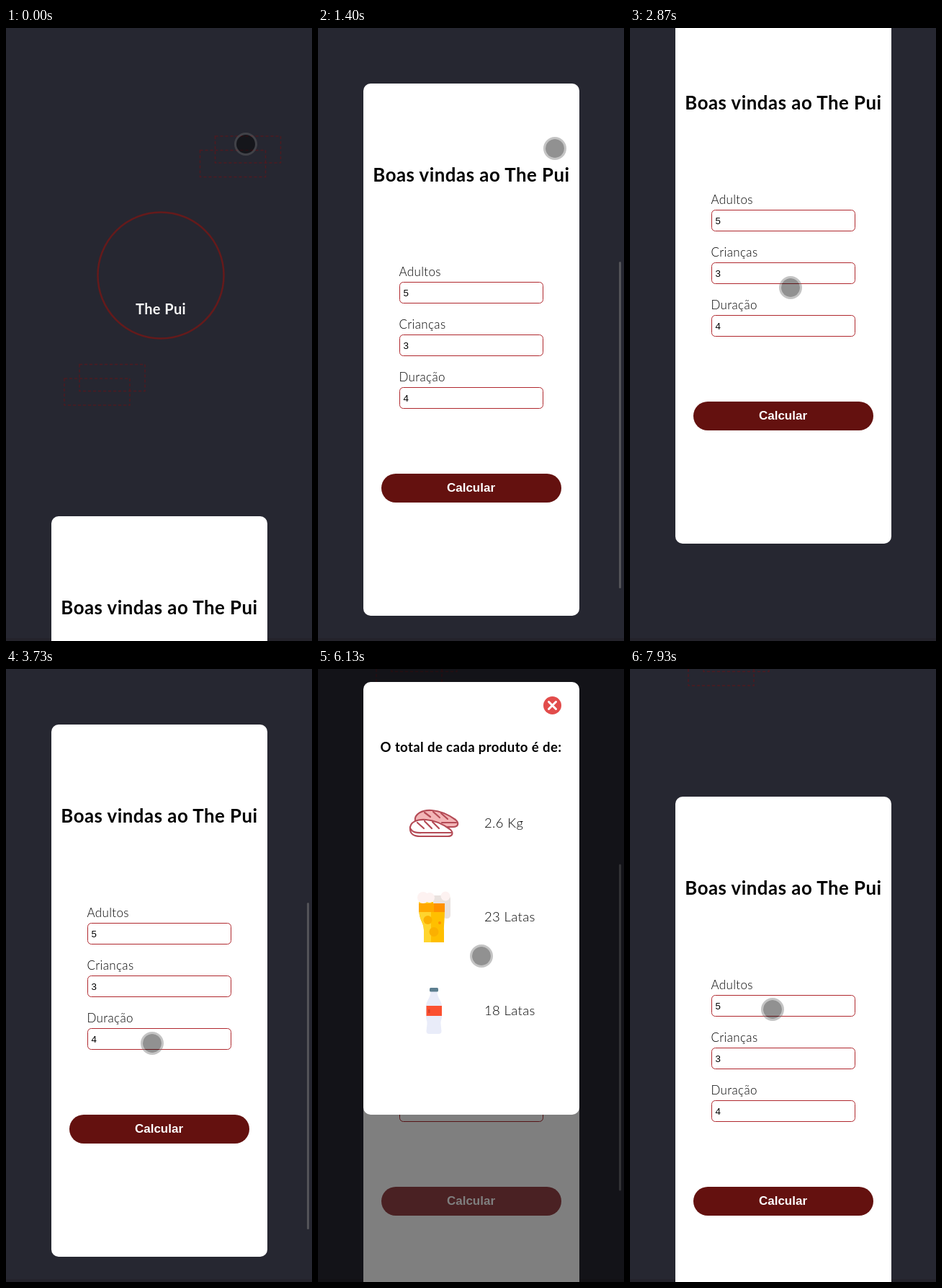
Write an HTML page that moves like this. It is 425 by 850 pixels and loops after 8 s.

```html
<!DOCTYPE html>
<html lang="pt">
<head>
<meta charset="utf-8">
<title>The Pui</title>
<style>
html, body { margin: 0; width: 100%; height: 100%; overflow: hidden; background: #262731; }
svg { display: block; width: 100%; height: 100%; }
text { font-family: Lato, sans-serif; letter-spacing: .02em; }
.mid { text-anchor: middle; }
.bold { font-weight: 700; }
.arial { font-family: "Liberation Sans", Arial, sans-serif; letter-spacing: 0; }
.light { font-weight: 300; font-size: 17px; }
.amount { font-size: 18.5px; }
.dash { fill: none; stroke: #4e1a20; stroke-width: 1.5; stroke-dasharray: 4 3; }
.field { fill: #fff; stroke: #b0282e; }
.meat { stroke: #b44b56; stroke-width: 2.2; stroke-linecap: round; stroke-linejoin: round; }
</style>
</head>
<body>
<svg viewBox="0 0 425 850">
  <defs>
    <g id="pair" class="dash">
      <rect x="21" width="91" height="37"/>
      <rect y="19.500" width="91" height="37"/>
    </g>
  </defs>
  <rect width="425" height="850" fill="#262731"/>
  <rect y="846" width="425" height="4" fill="#24232b"/>

  <g id="page">
    <use href="#pair" x="269.500" y="150"/>
    <use href="#pair" x="81" y="466.500"/>
    <circle cx="215" cy="343" r="87.500" fill="none" stroke="#651a1b" stroke-width="2.500"/>
    <text class="mid bold" x="215" y="397" font-size="20" fill="#f4f4f4">The Pui</text>

    <rect x="63" y="677" width="300" height="738" rx="10" fill="#fff"/>
    <text class="mid bold" x="213" y="813" font-size="25.800">Boas vindas ao The Pui</text>
    <g id="fields"></g>
    <rect id="button" x="88" y="1218" width="250" height="40" rx="20"/>
    <text class="mid bold arial" x="212.500" y="1243" font-size="17" fill="#fff">Calcular</text>
  </g>

  <g id="modal">
    <rect width="425" height="850" opacity=".5"/>
    <rect x="63" y="18" width="300" height="600" rx="10" fill="#fff"/>
    <circle cx="325.500" cy="50.500" r="12.500" fill="#e24c4b"/>
    <path d="M320.500 45.500l10 10m0-10l-10 10" stroke="#fff" stroke-width="3" stroke-linecap="round"/>
    <text class="mid bold" x="212.500" y="115" font-size="18.600">O total de cada produto é de:</text>

    <g class="meat">
      <path fill="#f3b5b7" d="M135 211C133 201 145 195 158 196C173 197 184 204 191 209C197 214 194 219 188 219H150Z"/>
      <path fill="none" d="M148 199l8 6m4-7l9 8m2-6l9 8M172 213h20"/>
      <path fill="#fff" d="M128 222C127 212 138 208 150 209C164 210 176 217 183 222C189 227 187 232 180 232H142C133 232 128 228 128 222Z"/>
      <path fill="none" d="M128 221C132 228 139 227 146 227H185M138 213l9 8m1-10l10 10m1-9l9 9"/>
    </g>

    <rect x="174" y="314" width="10" height="32" rx="4.500" fill="#e9e2df"/>
    <path id="glass" fill="#ffbf00" d="M140 323H176V330C176 350 175 350 175 362V379H147V362C147 350 140 350 140 330Z"/>
    <path fill="#ffd52e" d="M140 323H157V379H147V362C147 350 140 350 140 330Z"/>
    <path fill="#ffa800" d="M140 325h21v12h-21z"/>
    <path fill="#ff9100" d="M161 325h15v12h-15z"/>
    <g fill="#fbb000">
      <circle cx="152.500" cy="348" r="6"/><circle cx="161" cy="364.500" r="6.500"/>
      <circle cx="169" cy="352" r="2" fill="#ff9100"/>
    </g>
    <path fill="#e9e2df" d="M160 314h16v11h-16z"/>
    <g fill="#fdf2f1">
      <circle cx="146" cy="317" r="8"/><circle cx="155" cy="317" r="7"/><circle cx="177" cy="315" r="6.500"/>
    </g>

    <path fill="#e9ecf9" d="M156.500 447h9c0 9 6.500 13 6.500 21v14c0 4-2 6-1.500 10l1 10q0 4-4 4h-13q-4 0-4-4l1-10c.5-4-1.500-6-1.500-10v-14c0-8 6.500-12 6.500-21z"/>
    <rect x="155" y="442" width="12" height="5.500" rx="1.500" fill="#5d7f90"/>
    <path fill="#fb5030" d="M150.500 467h21.500v14h-21.500z"/>
    <path fill="#d8402a" d="M153 472h2.500v5h-2.500z"/>
    <g id="amounts"></g>
  </g>

  <rect id="thumb" x="418" width="3" height="453" rx="1.500" fill="#808080"/>
  <g id="cursor">
    <circle r="13" fill-opacity=".43"/>
    <circle r="14.500" fill="none" stroke="#6c6c6c" stroke-opacity=".4" stroke-width="3"/>
  </g>
</svg>
<script>
const LOOP = 8000, FPS = 15, OPEN = 4270, CLOSE = 7270;
const $ = id => document.getElementById(id);
const clamp = v => Math.min(1, Math.max(0, v));

// each move: start, duration, where it ends
const scrolls = [[530, 870, 600], [2070, 190, 700], [2930, 450, 600], [5130, 540, 500]];
const moves = [[70, 330, 329, 167], [1450, 950, 223, 360], [3400, 600, 188, 637],
  [OPEN, 400, 266, 407], [4670, 1000, 190, 414], [5870, 260, 227, 398],
  [6130, 540, 332, 57], [6730, 70, 332, 54], [CLOSE, 660, 198, 472]];

// follows the moves one after another from the first position
function follow(list, from, t) {
  return list.reduce((pos, [start, time, ...to]) => {
    const u = clamp((t - start) / time), s = u * u * (3 - 2 * u);
    return pos.map((v, i) => v + (to[i] - v) * s);
  }, from).map(Math.round);
}

// the scrollbar stays a moment after each scroll, then fades out
function thumbOpacity(t) {
  return Math.max(...scrolls.map(([start, time]) =>
    t > start ? clamp((start + time + 600 - t) / 250) : 0));
}

$('fields').innerHTML = [['Adultos', 5], ['Crianças', 3], ['Duração', 4]].map(([name, value], i) =>
  `<g transform="translate(113 ${952 + 73 * i})">
    <text class="light" x="-.5" y="-8">${name}</text>
    <rect class="field" x=".5" y=".5" width="199" height="29" rx="5"/>
    <text class="arial" x="5.500" y="20" font-size="13.33">${value}</text>
  </g>`).join('');

$('amounts').innerHTML = ['2.6 Kg', '23 Latas', '18 Latas'].map((text, i) =>
  `<text class="light amount" x="231" y="${220 + 130 * i}">${text}</text>`).join('');

function draw(now) {
  // whole frames, rounded to 10 ms
  const frame = Math.floor((now % LOOP + 4) * FPS / 1000);
  const t = Math.round(frame * 100 / FPS) * 10;
  const [scroll] = follow(scrolls, [0], t);
  const open = t >= OPEN && t < CLOSE;
  $('page').setAttribute('transform', `translate(0 ${-scroll})`);
  $('button').setAttribute('fill', open ? '#964246' : '#64110f');
  $('modal').style.display = open ? '' : 'none';
  $('thumb').setAttribute('y', 3.6 + scroll * .534);
  $('thumb').setAttribute('opacity', thumbOpacity(t) * .5);
  $('cursor').setAttribute('transform', `translate(${follow(moves, [333, 161], t)})`);
}

const start = performance.now();
function tick() {
  draw(performance.now() - start);
  requestAnimationFrame(tick);
}
tick();
</script>
</body>
</html>
```
